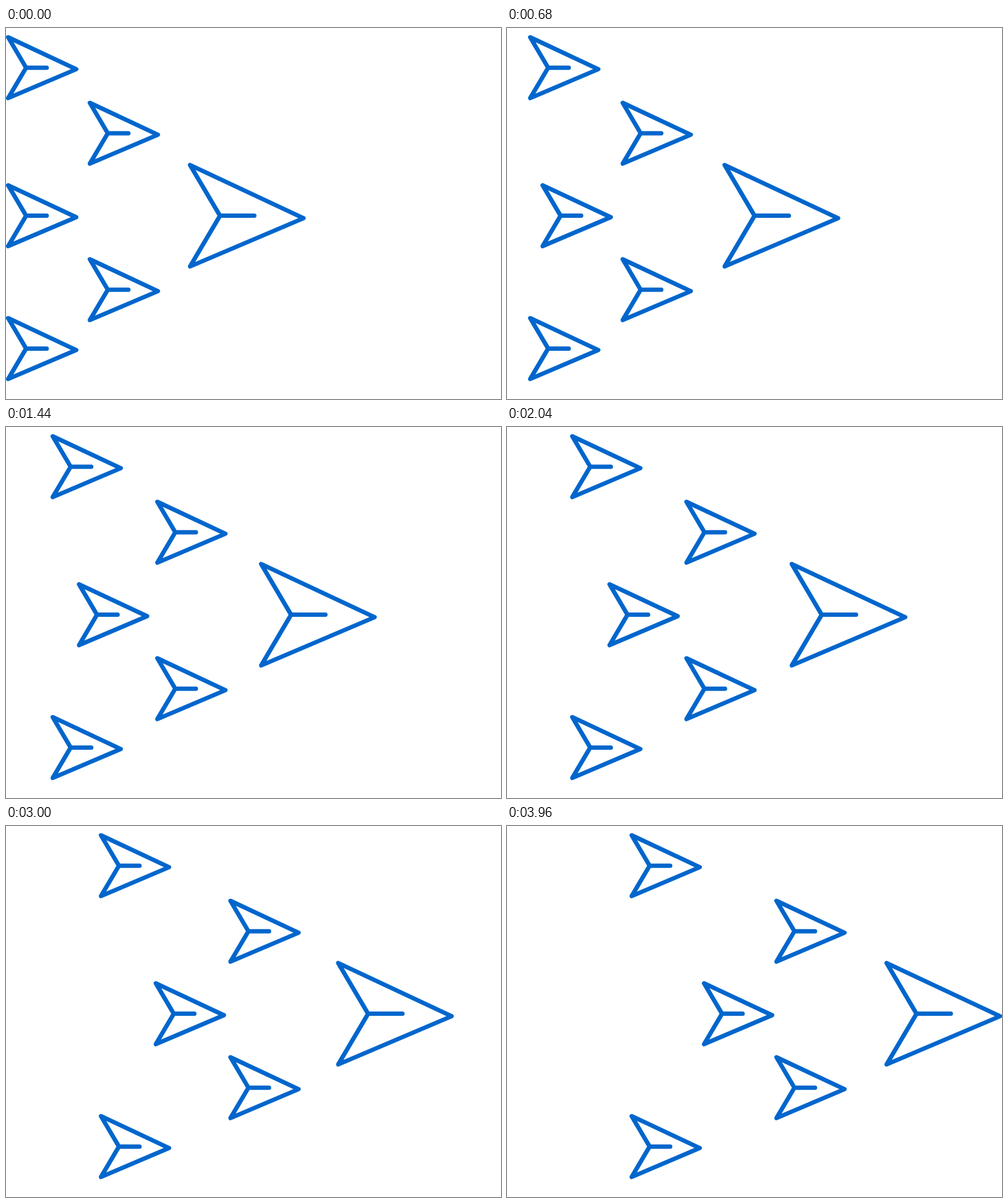
Animation of 800x600 px, one loop 4000 ms. Source, as an HTML page with a canvas:

```html
<!DOCTYPE html>
<html lang="en">
<head>
<meta charset="utf-8">
<title>Arrows in flight</title>
<style>
html, body { margin: 0; width: 100%; height: 100%; overflow: hidden; background: #fff; }
canvas { display: block; }
</style>
</head>
<body>
<canvas id="stage" width="800" height="600"></canvas>
<script>
const ctx = document.getElementById('stage').getContext('2d');
const LOOP = 4000, STEP = 40, LAST = LOOP / STEP - 1;
const EDGE = 3.5, WING = EDGE + 132;

// x, y is the upper left corner
function drawArrow(x, y, size = 1) {
  const length = 110 * size, half = 49.2 * size;
  const notch = 29 * size, stem = 33.3 * size, droop = 2.4 * size;
  ctx.beginPath();
  ctx.moveTo(x, y);
  ctx.lineTo(x + length, y + half + droop);
  ctx.lineTo(x, y + half * 2);
  ctx.lineTo(x + notch, y + half);
  ctx.closePath();
  ctx.moveTo(x + notch, y + half);
  ctx.lineTo(x + notch + stem, y + half);
  ctx.stroke();
}

function drawPair(x, top, gap) {
  drawArrow(x, top);
  drawArrow(x, top + gap);
}

function draw(time) {
  const progress = Math.floor((time % LOOP) / STEP) / LAST;
  const glide = (from, distance) => from + distance * progress;
  ctx.fillStyle = '#fff';
  ctx.fillRect(0, 0, 800, 600);
  ctx.strokeStyle = '#0066cc';
  ctx.lineWidth = 2 * EDGE;
  ctx.lineCap = ctx.lineJoin = 'round';
  drawPair(glide(EDGE, 198), 15, 454.2);
  drawPair(glide(WING, 300), 121, 253);
  drawArrow(glide(EDGE, 315), 254.4);
  drawArrow(glide(297.5, 316), 221.6, 5 / 3);
}

const start = performance.now();
function tick() {
  draw(performance.now() - start);
  requestAnimationFrame(tick);
}
tick();
</script>
</body>
</html>
```
